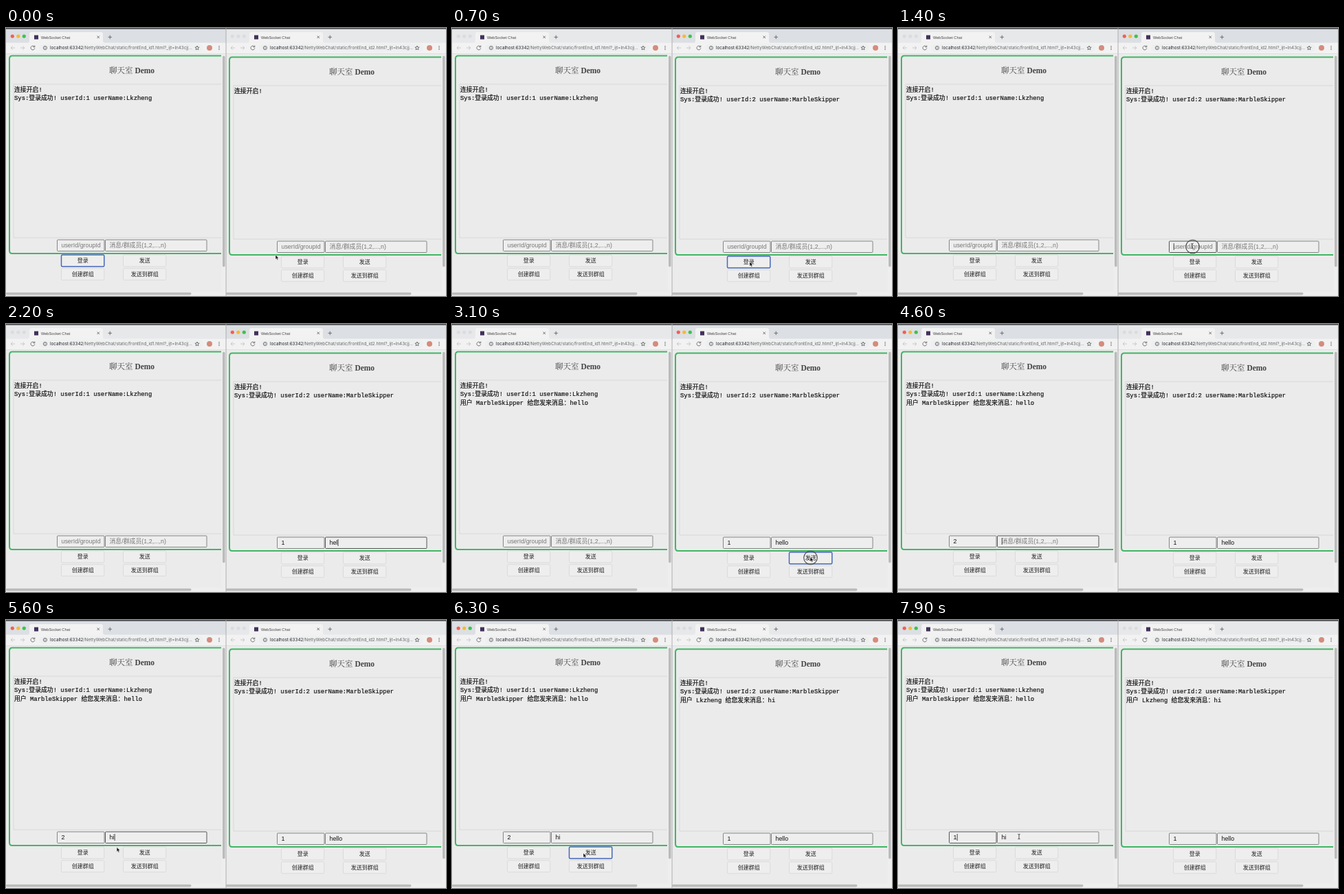
These frames come from a looping animation (640x391 px, 8000 ms). An HTML page:

```html
<!DOCTYPE html>
<html lang="zh">
<head>
<meta charset="utf-8">
<title>WebSocket Chat</title>
<style>
html, body { margin: 0; width: 100%; height: 100%; overflow: hidden; background: #ebebeb; }
svg { display: block; width: 640px; height: 391px; }
text { white-space: pre; font-family: "Liberation Sans", "Noto Sans CJK SC", sans-serif; }
.tab { font-size: 5.65px; fill: #444; }
.url { font: 6.3px Inter, "Liberation Sans", sans-serif; fill: #666; }
.title { font: 11.5px "Liberation Serif", "Noto Serif CJK SC", "Noto Sans CJK SC", serif; fill: #444; }
.log { font: 8.87px "Liberation Mono", "Noto Sans CJK SC", monospace; fill: #111; stroke: #111; stroke-width: .2; }
.field { font-size: 8.9px; fill: #111; }
.hint { fill: #777; }
.btn { font-size: 8px; font-weight: 500; fill: #222; text-anchor: middle; }
.icon { fill: none; stroke: #666; stroke-width: .9; }
.pale { stroke: #c2c2c2; }
</style>
</head>
<body>
<svg id="stage" viewBox="0 0 640 391"></svg>
<script>
const LOOP = 8000, STEP = 100;
const stage = document.getElementById('stage');
const pen = document.createElement('canvas').getContext('2d');
pen.font = '8.9px "Liberation Sans", sans-serif';

const USERS = ['Lkzheng', 'MarbleSkipper'];
const HINTS = ['userId/groupId', '消息/群成员(1,2,...,n)'];
const FIELDS = [[74.5, 68.5], [144.5, 147.5]];
const BUTTONS = [['登录', 80.5, 331], ['发送', 170.5, 331], ['创建群组', 80.5, 350.8], ['发送到群组', 170.5, 350.8]];

// Each track lists [time, value]; the value holds until the next entry.
const TRACKS = {
  active: [[0, 0], [400, 1], [3700, 0]],
  id0: [[0, ''], [4200, '2'], [7400, ''], [7600, '1']],
  msg0: [[0, ''], [5000, 'h'], [5200, 'hi']],
  id1: [[0, ''], [1500, '1']],
  msg1: [[0, ''], [1900, 'h'], [2000, 'he'], [2200, 'hel'], [2300, 'hell'], [2500, 'hello']],
  focus0: [[0, 'b0'], [400, ''], [3800, 'f0'], [4500, 'f1'], [6000, 'b1'], [7100, 'f0']],
  focus1: [[0, ''], [500, 'b0'], [1300, 'f0'], [1700, 'f1'], [3000, 'b1'], [3900, '']],
  pointer: [[0, 1], [1500, 0], [2600, 1], [4200, 0], [5300, 1], [7400, 0], [7700, 1]]
};
const PATH = [[0, 392, 331], [400, 433, 341], [900, 433, 341], [1200, 428, 318], [2600, 428, 318],
  [2900, 521, 340], [3200, 521, 340], [3600, 106, 316], [5300, 106, 316], [5800, 191, 340],
  [6500, 191, 340], [7000, 98, 316], [7300, 98, 316], [7700, 176, 316], [8000, 176, 316]];
const CLICKS = [400, 1300, 3000, 3700, 6000, 7100];

const at = (name, t) => TRACKS[name].filter(e => e[0] <= t).pop()[1];

function pointerAt(t) {
  const i = PATH.findIndex(p => p[0] > t);
  const [a, b] = [PATH[i - 1], PATH[i]];
  const u = (t - a[0]) / (b[0] - a[0]), k = u * u * (3 - 2 * u);
  return [a[1] + (b[1] - a[1]) * k, a[2] + (b[2] - a[2]) * k];
}

const rect = (x, y, w, h, fill, extra = '') =>
  `<rect x="${x}" y="${y}" width="${w}" height="${h}" fill="${fill}" ${extra}/>`;
const dot = (x, y, r, fill) => `<circle cx="${x}" cy="${y}" r="${r}" fill="${fill}"/>`;
const label = (cls, x, y, s) => `<text class="${cls}" x="${x}" y="${y}">${s}</text>`;
const icon = (d, cls = '') => `<path class="icon ${cls}" d="${d}"/>`;

function chrome(n, on) {
  const lights = on ? ['#f45d54', '#f6b930', '#3bc34b'] : Array(3).fill('#dadcdf');
  return rect(0, 0, 320, 22, on ? '#dcdfe3' : '#e7e8ea') +
    rect(0, 0, 320, 1.6, '#484a4c') +
    lights.map((c, i) => dot(9.3 + i * 8.5, 12, 2.6, c)).join('') +
    `<path d="M31 22Q34 22 34 18V9Q34 6 37 6H138Q141 6 141 9V18Q141 22 144 22Z" fill="#f2f2f2"/>` +
    rect(0, 21.5, 320, 16, '#f2f2f2') + rect(0, 37, 320, .7, '#dadada') +
    rect(41, 10.5, 6, 6, '#41315c') +
    label('tab', 51, 15.6, 'WebSocket Chat') +
    icon('M132.5 11.5l3.5 3.5m0-3.5l-3.5 3.5M148.5 13.3h5.5m-2.75-2.75v5.5') +
    icon('M13 29H7m2.7-2.7L7 29l2.7 2.7M21 29h6m-2.7-2.7L27 29l-2.7 2.7', 'pale') +
    icon('M41.2 27.2a2.9 2.9 0 1 0 .6 2.3M41.8 25.5v2.3h-2.3') +
    rect(48, 23.5, 239, 11.5, '#eeeff0', 'rx="5.7"') +
    icon('M59.5 29a2.6 2.6 0 1 0-5.2 0a2.6 2.6 0 1 0 5.2 0M56.9 28.6v1.7M56.9 27.2v.7') +
    label('url', 64, 31.2, `<tspan fill="#222">localhost:63342</tspan>/NettyWebChat/static/frontEnd_id${n + 1}.html?_ijt=ln43cjj...`) +
    icon('M278 26l.9 2 2.2.2-1.7 1.4.5 2.2-1.9-1.2-1.9 1.2.5-2.2-1.7-1.4 2.2-.2Z') +
    dot(296, 29, 4, '#d58c7c') +
    [26.7, 29, 31.3].map(y => dot(310, y, .7, '#555')).join('');
}

function field(n, i, t, focus) {
  const [x, w] = FIELDS[i], value = at((i ? 'msg' : 'id') + n, t), on = focus === 'f' + i;
  const caret = x + 6.3 + pen.measureText(value).width;
  return rect(x, 309, w, 16.5, '#eeeeee', `rx="1" stroke="${on ? '#555' : '#858585'}"`) +
    label(value ? 'field' : 'field hint', x + 6, 320.3, value || HINTS[i]) +
    (on ? rect(caret, 312, .8, 10, '#222') : '');
}

function button([name, x, y], i, focus) {
  const on = focus === 'b' + i;
  return rect(x, y, 62.3, 17, '#eeeeee', `rx="1.5" stroke="${on ? '#4668b8' : '#d6d6d6'}" stroke-width="${on ? 1.5 : .8}"`) +
    label('btn', x + 31.2, y + 11.4, name);
}

function logLines(n, t) {
  const lines = ['连接开启!'];
  if (n === 0 || t >= 600) lines.push(`Sys:登录成功! userId:${n + 1} userName:${USERS[n]}`);
  if (t >= (n ? 6100 : 3100)) lines.push(`用户 ${USERS[1 - n]} 给您发来消息：${n ? 'hi' : 'hello'}`);
  return lines.map((s, i) => label('log', 12, 93 + i * 12.4, s)).join('');
}

function browser(n, t) {
  const focus = at('focus' + n, t);
  return `<g transform="translate(${n * 320})">` + rect(0, 0, 320, 391, '#ebebeb') +
    chrome(n, at('active', t) === n) +
    `<g transform="translate(0 ${n * 2})">` +
    `<path d="M313 40.5H9Q5 40.5 5 45V324.5Q5 329 9 329H313" fill="none" stroke="#40b664" stroke-width="2"/>` +
    label('title', 150, 65.5, '聊天室 <tspan font-weight="bold">Demo</tspan>') +
    `<path d="M313 82H11V306H313" fill="none" stroke="#d3d3d3" stroke-width=".8"/>` +
    logLines(n, t) + field(n, 0, t, focus) + field(n, 1, t, focus) +
    BUTTONS.map((b, i) => button(b, i, focus)).join('') + '</g>' +
    rect(313.5, 38, 6.5, 353, '#eeeeee') + rect(0, 384.5, 320, 6.5, '#eeeeee') +
    rect(315, 40.5, 3.6, 308, '#bbbbbb', 'rx="1.8"') +
    rect(0, 385.8, 269.5, 3.6, '#bbbbbb', 'rx="1.8"') + '</g>';
}

function pointer(t) {
  if (!at('pointer', t)) return '';
  const [x, y] = pointerAt(t);
  const clicked = CLICKS.some(c => t >= c && t < c + 200);
  const inField = t >= 7000 || (t >= 1200 && t < 2700) || (t >= 3800 && t < 5400);
  const shape = inField
    ? '<path d="M-1.6-3.6Q0-3.6 0-2.5Q0-3.6 1.6-3.6M0-2.5V2.5M-1.6 3.6Q0 3.6 0 2.5Q0 3.6 1.6 3.6" fill="none" stroke="#222" stroke-width=".8"/>'
    : '<path d="M0 0V6.6L1.5 5.2L2.6 7.6L3.8 7.1L2.8 4.8H4.8Z" fill="#111" stroke="#fff" stroke-width=".5"/>';
  const ring = '<circle cx=".5" cy="1" r="9.8" fill="none" stroke="#444" stroke-width="1.1"/>';
  return `<g transform="translate(${x} ${y})">${clicked ? ring : ''}${shape}</g>`;
}

let shown = -1;
function frame(now) {
  const t = Math.floor(now % LOOP / STEP) * STEP;
  if (t !== shown) {
    stage.innerHTML = browser(0, t) + browser(1, t) +
      rect(319.6, 0, .9, 391, '#a8a8a8') + pointer(t);
    shown = t;
  }
  requestAnimationFrame(frame);
}
frame(0);
</script>
</body>
</html>
```
